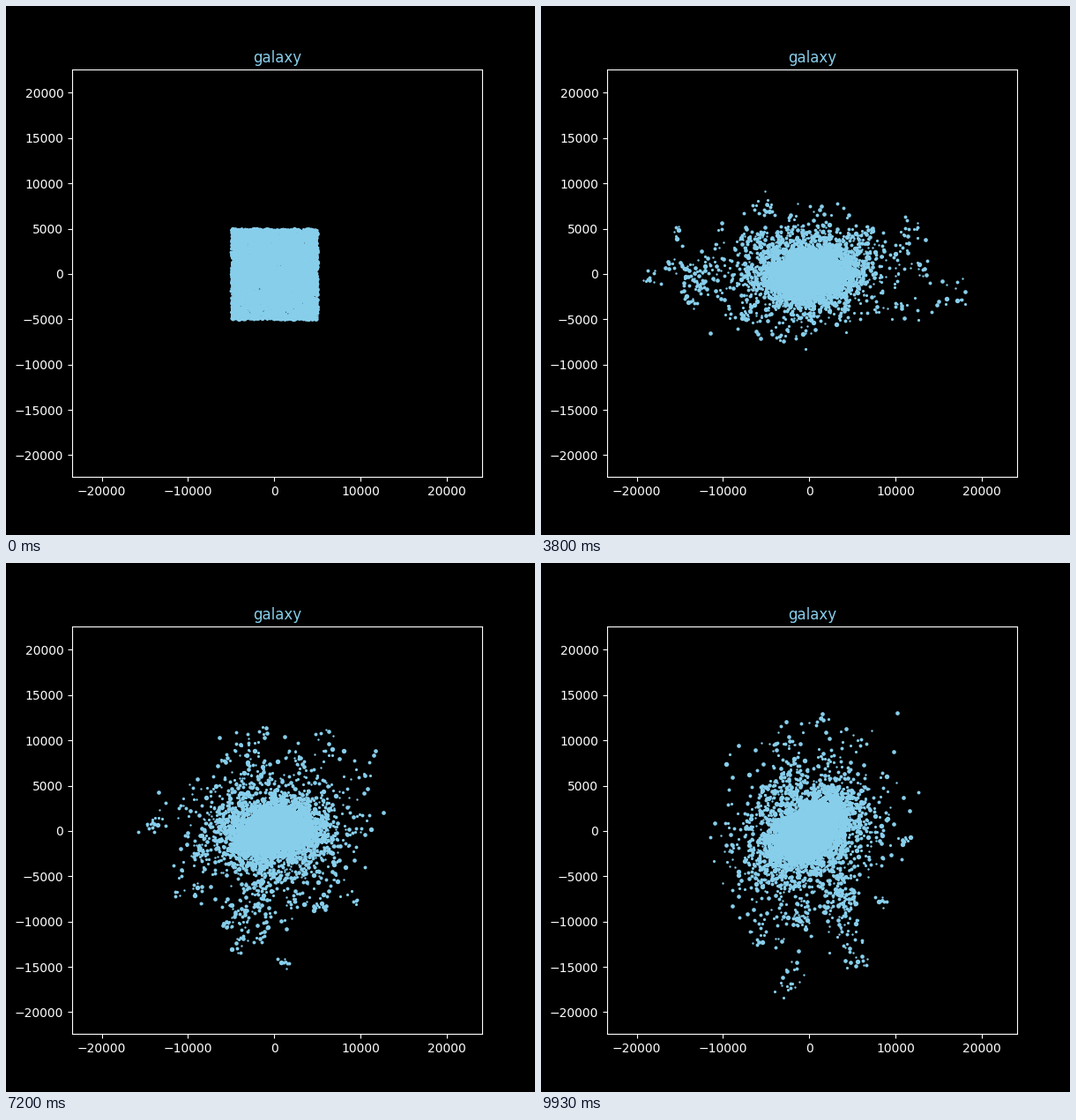
These frames come from a looping animation (600 px wide and 600 px high, 9990 ms). A matplotlib script:

```python
import numpy as np
import matplotlib.pyplot as plt
from matplotlib.animation import FuncAnimation

FRAMES, INTERVAL = 150, 66.6
CORE, CLOUD, HALO, CLUMPS = 4150, 1750, 600, 95
BOUND = CORE + CLOUD
TOTAL = BOUND + HALO
COLLAPSE = 0.45  # seconds until the square has fallen in
BLUE = "skyblue"
DIAMETERS = np.linspace(2.4, 5.4, 5)  # pixels

# How far the halo reaches sideways and upwards (thousands) over time
REACH_T = [0, 0.45, 1.2, 2.1, 3.9, 5.8, 7.2, 9.0, 9.9]
REACH_X = [2, 2, 10, 13, 21, 18, 15, 12, 12]
REACH_Y = [2, 2, 14, 12, 9, 14, 16.5, 19, 19]

rng = np.random.default_rng(12)


def ease(s):
    s = np.clip(s, 0, 1)
    return s * s * (3 - 2 * s)


start = rng.uniform(-5, 5, (TOTAL, 2))

# Bound stars circle in ellipses
rho = rng.rayleigh(size=BOUND)
phase = np.arctan2(start[:BOUND, 1], start[:BOUND, 0])
spin = rng.choice([1, 1, -1], BOUND) * 2.6 / (0.5 + rho)

# Halo stars travel in clumps that swing in and out
clump = rng.integers(CLUMPS, size=HALO)
clump_r = 0.4 + 0.6 * rng.random(CLUMPS) ** 1.4
clump_a = rng.uniform(0, 2 * np.pi, CLUMPS)
clump_swing = rng.uniform(0, 2 * np.pi, CLUMPS)
clump_spread = rng.uniform(0.25, 1.2, CLUMPS)
offset = rng.normal(size=(HALO, 2)) * clump_spread[clump, None]


def ellipse_at(t, part, major, minor, tilt):
    size = 1 - 0.4 * np.exp(-1.5 * t)
    a = phase[part] + spin[part] * t
    u = size * major * rho[part] * np.cos(a)
    v = size * minor * rho[part] * np.sin(a)
    c, s = np.cos(np.radians(tilt)), np.sin(np.radians(tilt))
    return np.c_[c * u - s * v, s * u + c * v]


def halo_at(t):
    r = clump_r * (0.8 + 0.2 * np.sin(1.6 * t + clump_swing))
    a = clump_a + 0.35 * t
    x = np.interp(t, REACH_T, REACH_X) * r * np.cos(a)
    y = np.interp(t, REACH_T, REACH_Y) * r * np.sin(a)
    return np.c_[x, y][clump] + offset


def positions(t):
    tilt = 5 + 28 * ease((t - 7) / 2.5)
    moved = np.vstack([
        ellipse_at(t, slice(0, CORE), 2.2, 1.35 - 0.01 * t, tilt),
        ellipse_at(t, slice(CORE, BOUND), 3 + 0.1 * t, 1.8 + 0.12 * t, tilt),
        halo_at(t)])
    fall = ease(t / COLLAPSE)
    return 1000 * ((1 - fall) * start + fall * moved)


fig, ax = plt.subplots(figsize=(6, 6), dpi=100, facecolor="black")
ax.set_facecolor("black")
ax.set_xlim(-23422, 24076)
ax.set_ylim(-22385, 22579)
ax.set_title("galaxy", color=BLUE)
ax.tick_params(color="white", labelcolor="white")
for spine in ax.spines.values():
    spine.set_color("white")

size_id = rng.choice(len(DIAMETERS), TOTAL, p=[0.2, 0.3, 0.27, 0.17, 0.06])
groups = []
for k, d in enumerate(DIAMETERS):
    dots, = ax.plot([], [], "o", ms=d * 0.72, mew=0, color=BLUE)
    groups.append((dots, size_id == k))


def update(i):
    pos = positions(i * INTERVAL / 1000)
    for dots, members in groups:
        dots.set_data(*pos[members].T)
    return [dots for dots, _ in groups]


anim = FuncAnimation(fig, update, frames=FRAMES, interval=INTERVAL,
                     repeat=True, repeat_delay=0)
plt.show()
```
